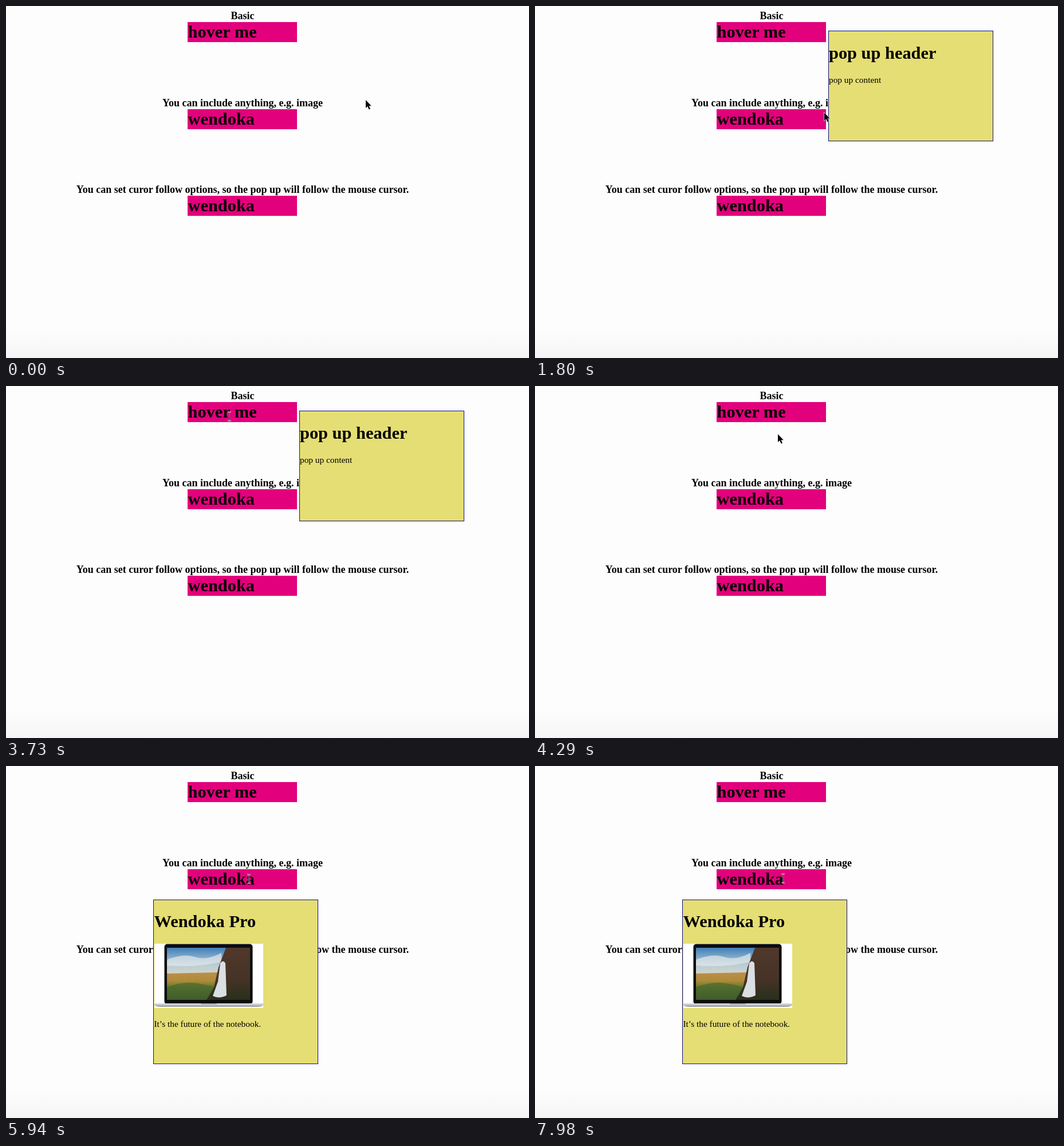
An HTML page for the animation above (8000 ms loop, 913 px wide and 614 px high).

```html
<!DOCTYPE html>
<html lang="en">
<head>
<meta charset="utf-8">
<title>Hover pop up</title>
<style>
  html, body { margin: 0; width: 100%; height: 100%; overflow: hidden; background: #fdfdfd; }
  svg { display: block; width: 913px; height: 614px; }
  text { font: 15.35px "Liberation Serif", "Times New Roman", serif; fill: #000; }
  .label { font-size: 18px; font-weight: bold; text-anchor: middle; }
  .title { font-size: 30.4px; font-weight: bold; }
  .button { fill: #e2007c; }
  .panel { fill: #e5de74; stroke: #101080; }
</style>
</head>
<body>
<svg viewBox="0 0 913 614">
  <defs>
    <linearGradient id="page" x2="0" y2="1">
      <stop offset=".92" stop-color="#fdfdfd"/><stop offset="1" stop-color="#f5f5f5"/>
    </linearGradient>
    <linearGradient id="sky" x2="0" y2="1">
      <stop stop-color="#3f7fb8"/><stop offset=".6" stop-color="#b9cdd8"/><stop offset="1" stop-color="#dcd6c0"/>
    </linearGradient>
    <linearGradient id="field" x2="0" y2="1">
      <stop stop-color="#b98f4c"/><stop offset=".3" stop-color="#b08b38"/>
      <stop offset=".55" stop-color="#5f7733"/><stop offset="1" stop-color="#2b4420"/>
    </linearGradient>
    <linearGradient id="cliff" x2="0" y2="1">
      <stop stop-color="#50382c"/><stop offset=".6" stop-color="#463226"/><stop offset="1" stop-color="#28301b"/>
    </linearGradient>
    <linearGradient id="base" x2="0" y2="1">
      <stop stop-color="#dcdde0"/><stop offset=".5" stop-color="#c3c5c9"/><stop offset="1" stop-color="#85888c"/>
    </linearGradient>
    <clipPath id="screen"><rect x="281" y="317" width="145" height="91"/></clipPath>
  </defs>

  <rect width="913" height="614" fill="url(#page)"/>
  <g id="sections"></g>

  <g id="basicPopup">
    <rect class="panel" x="512.5" y="43.5" width="287" height="192"/>
    <text class="title" x="513" y="92">pop up header</text>
    <text x="513" y="134">pop up content</text>
  </g>

  <g id="imagePopup">
    <rect class="panel" x="257.5" y="233.5" width="287" height="286"/>
    <text class="title" x="258.5" y="281">Wendoka Pro</text>
    <rect x="259" y="310" width="190" height="112" fill="#fff"/>
    <rect x="276.5" y="310.5" width="154" height="105" rx="5" fill="#0c0c0e"/>
    <g clip-path="url(#screen)">
      <rect x="281" y="317" width="145" height="50" fill="url(#sky)"/>
      <path d="M281 338Q310 326 330 333T376 326V342Q330 352 281 348Z" fill="#e4e9ea" opacity=".7"/>
      <path d="M281 362L370 360V408H281Z" fill="url(#field)"/>
      <path d="M281 386Q310 374 340 380T372 389V408H281Z" fill="#48692d" opacity=".7"/>
      <path d="M384 317H426V408H350L363 386L371 351Z" fill="url(#cliff)"/>
      <path d="M374 344Q379 337 383 344L385 400Q372 407 361 401L370 376Z" fill="#d9dfe3"/>
    </g>
    <path d="M259 414H449V417Q447 420 438 420H270Q261 420 259 417Z" fill="url(#base)"/>
    <rect x="340" y="414" width="28" height="2" rx="1" fill="#a4a6aa"/>
    <text x="258.5" y="455">It’s the future of the notebook.</text>
  </g>

  <g id="pointer">
    <path id="arrow" d="M0 0V14L3.2 11.1L5.6 16.6L8 15.6L5.6 10.2H9.8Z"
      fill="#050510" stroke="#fff" stroke-width="1.1" paint-order="stroke"/>
    <g id="beam" fill="none">
      <path id="stem" d="M-3-8Q0-8 0-6Q0-8 3-8M0-6V6M-3 8Q0 8 0 6Q0 8 3 8M-2 3H2" stroke="#c79ab4" stroke-width="2" opacity=".6"/>
      <use href="#stem" style="stroke:#30202c"/>
      <path d="M0-6V6M-2 3H2" stroke="#30202c"/>
    </g>
  </g>
</svg>

<script>
  const LOOP = 8000;
  const PITCH = 151.7;
  const byId = id => document.getElementById(id);
  const sectionTop = i => Math.round(i * PITCH);

  const sections = [
    ["Basic", "hover me"],
    ["You can include anything, e.g. image", "wendoka"],
    ["You can set curor follow options, so the pop up will follow the mouse cursor.", "wendoka"],
  ];
  byId("sections").innerHTML = sections.map(([label, name], i) => `
    <g transform="translate(0 ${sectionTop(i)})">
      <text class="label" x="413" y="23">${label}</text>
      <rect class="button" x="317" y="28" width="191" height="35"/>
      <text class="title" x="317.5" y="55">${name}</text>
    </g>`).join("");

  // The pointer glides between a few resting places.
  const stops = [
    { t: 0, x: 628, y: 164 },
    { t: 900, x: 465, y: 56 },
    { t: 1700, x: 505, y: 186 },
    { t: 2590, x: 505, y: 195 },
    { t: 2830, x: 440, y: 42 },
    { t: 3730, x: 390, y: 53 },
    { t: 5120, x: 488, y: 142 },
    { t: 5800, x: 424, y: 197 },
    { t: 6810, x: 424, y: 197 },
    { t: LOOP, x: 433, y: 196 },
  ];

  const ease = k => (1 - Math.cos(Math.PI * k)) / 2;

  function pointAt(t) {
    const next = stops.findIndex(stop => stop.t > t);
    const a = stops[next - 1], b = stops[next];
    const k = ease((t - a.t) / (b.t - a.t));
    return [a.x + (b.x - a.x) * k, a.y + (b.y - a.y) * k].map(Math.round);
  }

  const overTitle = (x, y) => x > 317 && x < 438 &&
    sections.some((_, i) => y > sectionTop(i) + 28 && y < sectionTop(i) + 63);

  const show = (id, visible) => { byId(id).style.display = visible ? "" : "none"; };

  function draw() {
    const t = performance.now() % LOOP;
    const [x, y] = pointAt(t);
    const beam = overTitle(x, y);
    show("basicPopup", t >= 860 && t < 4070);
    show("imagePopup", t >= 5500);
    show("beam", beam);
    show("arrow", !beam);
    byId("pointer").setAttribute("transform", `translate(${x} ${y})`);
    requestAnimationFrame(draw);
  }
  draw();
</script>
</body>
</html>
```
